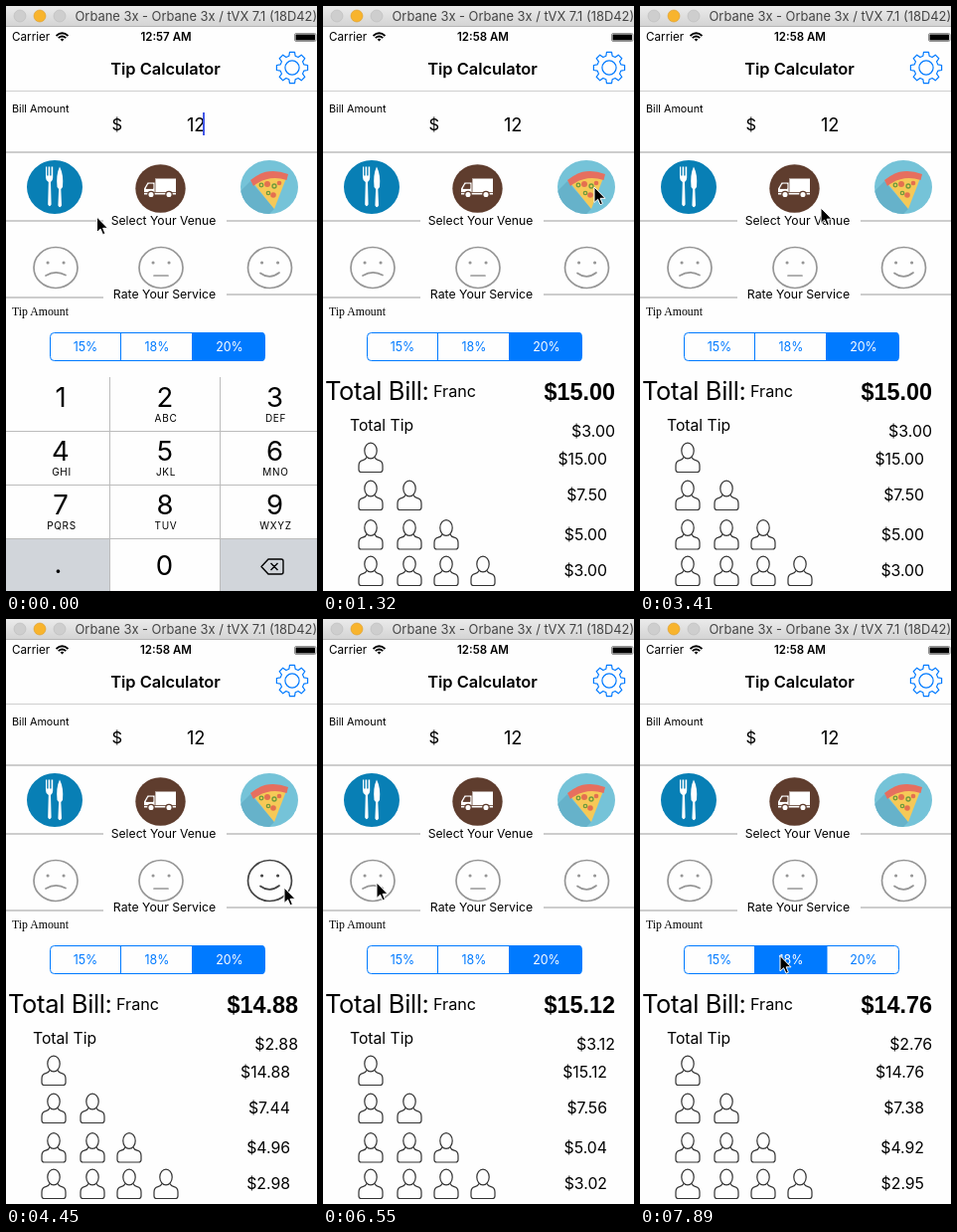
An HTML page that plays this animation: 313x588 px, repeating every 8 s.

```html
<!DOCTYPE html>
<html lang="en">
<head>
<meta charset="utf-8">
<title>Tip Calculator</title>
<style>
  html, body { margin: 0; width: 100%; height: 100%; overflow: hidden; background: #fefefe; }
  svg { display: block; width: 313px; height: 588px; font-family: Inter, Roboto, sans-serif; }
  .rule { stroke: #cdcdcd; stroke-width: 2; }
  .mid { text-anchor: middle; }
  .end { text-anchor: end; }
  .face { fill: none; stroke: #969696; stroke-width: 1.7; stroke-linecap: round; }
  .face.down { stroke: #444; }
  .person { fill: none; stroke: #333; stroke-width: 1.2; }
  .segment rect { fill: none; }
  .segment text { fill: #007aff; font-size: 12.4px; }
  .segment.press rect { fill: #007aff; fill-opacity: .2; }
  .segment.on rect { fill: #007aff; }
  .segment.on text { fill: #fff; }
  .sub { font-size: 10px; letter-spacing: .7px; }
</style>
</head>
<body>
<svg viewBox="0 0 313 588">
  <defs>
    <linearGradient id="chrome" x2="0" y2="1">
      <stop stop-color="#ebebeb"/><stop offset="1" stop-color="#d3d3d3"/>
    </linearGradient>
    <clipPath id="control"><rect x="44" y="328" width="217" height="29" rx="4"/></clipPath>
    <clipPath id="plate"><ellipse cx="265" cy="182" rx="29" ry="27"/></clipPath>
    <g id="person" class="person">
      <ellipse cy="8" rx="6.2" ry="7.8"/>
      <path d="M-4 14.500Q-5 17-8 17.600Q-12 18.500-12 23V27Q-12 29.500-9.500 29.500H9.500Q12 29.500 12 27V23Q12 18.500 8 17.600Q5 17 4 14.500"/>
    </g>
  </defs>
  <rect width="313" height="588" fill="#fefefe"/>

  <!-- window bar -->
  <rect width="313" height="21" fill="url(#chrome)"/>
  <path d="M0 20.5H313" stroke="#b5b5b5"/>
  <g stroke-width=".6">
    <circle cx="14" cy="10" r="6" fill="#cecece" stroke="#bbb"/>
    <circle cx="34" cy="10" r="6" fill="#f8b42d" stroke="#dc9d2a"/>
    <circle cx="54" cy="10" r="6" fill="#cecece" stroke="#bbb"/>
  </g>
  <text x="69.5" y="15" font-size="12.9" fill="#444">Orbane 3x - Orbane 3x / tVX 7.1 (18D42)</text>

  <!-- status and navigation -->
  <text x="6" y="35" font-size="11.7">Carrier</text>
  <g fill="none" stroke="#000" stroke-width="1.7">
    <path d="M50.5 30Q56.5 24.5 62.5 30M52.7 32.2Q56.5 28.8 60.3 32.2"/>
    <path d="M54.6 33.6Q56.5 32 58.4 33.6L56.5 35.6Z" fill="#000" stroke="none"/>
  </g>
  <text id="clock" class="mid" x="161" y="35" font-size="11.5" font-weight="600"></text>
  <rect x="290.5" y="27.5" width="21.5" height="8" rx="1.5" fill="none" stroke="#777" stroke-width=".8"/>
  <rect x="291.500" y="28.500" width="19.500" height="6" rx=".5"/>
  <text class="mid" x="160.5" y="69" font-size="16.4" font-weight="600">Tip Calculator</text>
  <g transform="translate(288 62)" fill="none" stroke="#007aff" stroke-width="1.2" stroke-linejoin="round">
    <path id="gear"/><circle r="7.1"/>
  </g>
  <path d="M0 85.5H313" stroke="#cfcfcf"/>

  <!-- bill -->
  <text x="6" y="107" font-size="10.8">Bill Amount</text>
  <text x="106.5" y="125" font-size="16.5">$</text>
  <text class="end" x="200.5" y="125.5" font-size="18.3">12</text>
  <rect id="caret" x="198" y="107" width="2" height="23" fill="#4257e6"/>
  <path class="rule" d="M0 147H313M0 216H98M222 216H313M0 293H98M222 290H313"/>

  <!-- venues -->
  <ellipse cx="49" cy="182" rx="28" ry="27" fill="#087fb5"/>
  <g fill="#fff">
    <path d="M40 161.500h1.2v9h1.4v-9h1.6v9h1.4v-9h1.6v11q0 3-2.2 4.500l.6 22.500q-1.700 3.500-3.400 0l.6-22.500q-2.800-1.500-2.800-4.500z"/>
    <path d="M54 161.500q4.200 8 3 20.500l-1.700 2 .7 16.500q-1.800 3.500-3.600 0l.7-16.500-1.600-2q-1.300-12.500 2.500-20.500z"/>
  </g>
  <ellipse cx="155.500" cy="183.500" rx="25.200" ry="24.300" fill="#5f3d2e"/>
  <path d="M150 173.500h21v16h-32v-6l3.500-6h7.500z" fill="#fff"/>
  <path d="M143.500 179h4.500v4.500h-7zM150 174v13M139 187.500h32" fill="#5f3d2e" stroke="#5f3d2e" stroke-width=".8"/>
  <g fill="#fff" stroke="#5f3d2e" stroke-width="1.3"><circle cx="146" cy="189.500" r="3.200"/><circle cx="164" cy="189.500" r="3.200"/></g>
  <g clip-path="url(#plate)">
    <rect x="236" y="155" width="58" height="54" fill="#75c3d8"/>
    <path d="M246 176L226 196L250 224L270 204Z" fill="#66b2ca"/>
  </g>
  <path d="M249 178Q264 167 282 173L270 204Z" fill="#f6c957"/>
  <path d="M246 175Q262 161 284 169L282.500 175Q264 169 249 181Z" fill="#e66f5f"/>
  <g fill="#e4704f"><circle cx="263" cy="179" r="3"/><circle cx="269" cy="190" r="2.800"/><circle cx="275" cy="178" r="2.300"/></g>
  <g fill="none" stroke="#6e9a3c" stroke-width="1.300"><circle cx="257" cy="180" r="1.800"/><circle cx="270" cy="181" r="2"/><circle cx="264" cy="188" r="1.700"/></g>
  <text class="mid" x="158.500" y="220" font-size="12.200">Select Your Venue</text>

  <!-- service -->
  <g id="faces"></g>
  <text class="mid" x="159.500" y="294" font-size="12.300">Rate Your Service</text>

  <!-- tip -->
  <text x="6" y="311" font-size="11.800" font-family="Liberation Serif, serif">Tip Amount</text>
  <g id="segments" clip-path="url(#control)"></g>
  <path d="M115.500 328.500V356.500M187.500 328.500V356.500" stroke="#007aff"/>
  <rect x="44.500" y="328.500" width="216" height="28" rx="4" fill="none" stroke="#007aff"/>

  <!-- totals -->
  <text x="2" y="396" font-size="25.500" letter-spacing="-.35">Total Bill:</text>
  <text x="111" y="393" font-size="16.200">Franc</text>
  <text id="total" class="end" x="294" y="396" font-size="23.400" font-weight="700" font-family="Liberation Sans, sans-serif"></text>
  <text x="27" y="427" font-size="15.700">Total Tip</text>
  <text id="tip" class="end" x="294" y="432.500" font-size="15.900"></text>
  <g id="splits"></g>

  <g id="keyboard"></g>
  <path id="pointer" d="M0 0V15.500L3.600 12.200 6 17.700 8.400 16.700 6.100 11.300H11Z" stroke="#fff" stroke-width="1"/>
</svg>
<script>
const $ = id => document.getElementById(id);
const LOOP = 8000, BILL = 12;

// [first change, last change, steps, x, y]
const moves = [
  [140, 1170, 8, 278, 184], [1320, 1320, 1, 273, 182], [1470, 1620, 2, 204, 183],
  [2060, 2510, 4, 38, 269], [2660, 2960, 3, 274, 267], [3110, 3560, 4, 165, 191],
  [3850, 4150, 3, 279, 267], [4300, 4300, 1, 280, 270], [4900, 5350, 4, 154.5, 257.5],
  [5950, 6400, 4, 54, 265], [6850, 7450, 5, 141, 338.5]
];
const rates = [[0, 20], [1170, 25], [3700, 24], [4600, 30], [5650, 28], [6550, 26], [7890, 23]];
const slides = [[0, 0], [290, 70], [440, 165], [580, 220]];
const parties = [1, 2, 3, 5];

const latest = (list, t) => list.filter(([at]) => at <= t).pop()[1];
const money = value => '$' + value.toFixed(2);
const between = (t, from, to) => t >= from && t < to;

function gearPath() {
  const points = [];
  for (let tooth = 0; tooth < 8; tooth++) {
    for (const [offset, r] of [[-.26, 12.2], [-.16, 15.8], [.16, 15.8], [.26, 12.2]]) {
      const a = tooth * Math.PI / 4 + offset;
      points.push((r * Math.cos(a)).toFixed(2) + ' ' + (r * Math.sin(a)).toFixed(2));
    }
  }
  return 'M' + points.join('L') + 'Z';
}

function keyboardMarkup() {
  const centers = [55, 160, 270.5];
  const letters = ['', 'ABC', 'DEF', 'GHI', 'JKL', 'MNO', 'PQRS', 'TUV', 'WXYZ'];
  const digit = (x, y, s) => `<text class="mid" x="${x}" y="${y}" font-size="27.5">${s}</text>`;
  const keys = letters.map((sub, i) => {
    const x = centers[i % 3], y = 403 + 54 * Math.floor(i / 3);
    return digit(x, y, i + 1) + `<text class="mid sub" x="${x + 1}" y="${y + 15}">${sub}</text>`;
  }).join('');
  return `<rect y="373" width="313" height="215" fill="#fefefe"/>
    <path d="M0 535.5H104.500V588H0ZM215.500 535.500H313V588H215.500Z" fill="#d1d5da"/>
    <path d="M0 427.500H313M0 481.500H313M0 535.500H313M104.500 373V588M215.500 373V588" stroke="#bcbcbc" fill="none"/>
    ${keys}${digit(52.500, 570, '.')}${digit(159.500, 572, 0)}
    <path d="M257 563.500L264 556H277Q279 556 279 558V569Q279 571 277 571H264ZM266.500 560L273.500 567M273.500 560L266.500 567"
      fill="none" stroke="#000" stroke-width="1.400" stroke-linejoin="round"/>`;
}

$('gear').setAttribute('d', gearPath());
$('keyboard').innerHTML = keyboardMarkup();
$('faces').innerHTML = [
  [50, 'M-10 8Q0 2 10 7.500'], [156, 'M-7 8H7'], [265.5, 'M-9.500 5.500Q0 12.500 9.500 5'] 
].map(([x, mouth]) => `<g class="face" transform="translate(${x} 263)">
  <ellipse rx="22" ry="20.500"/><path d="${mouth}"/>
  <path d="M-8-5h.1M8-5h.1" stroke-width="3"/></g>`).join('');
$('segments').innerHTML = [[44, 15, 80], [115.5, 18, 152], [187.5, 20, 225]].map(([x, rate, mid]) =>
  `<g class="segment"><rect x="${x}" y="328" width="73" height="29"/>
  <text class="mid" x="${mid}" y="347">${rate}%</text></g>`).join('');
$('splits').innerHTML = [439, 477, 516.5, 553].map((y, row) =>
  [48, 87, 124, 161].slice(0, row + 1).map(x => `<use href="#person" x="${x}" y="${y}"/>`).join('') +
  `<text class="end split" x="286" y="${[461, 497, 537, 573][row]}" font-size="15.800"></text>`).join('');

const faces = [...$('faces').children];
const segments = [...$('segments').children];
const splits = [...document.querySelectorAll('.split')];

function pointerAt(t) {
  let x = 91.5, y = 212;
  for (const [start, end, steps, toX, toY] of moves) {
    if (t < start) break;
    const done = end > start ? Math.floor((t - start) / (end - start) * (steps - 1) + .01) + 1 : 1;
    const p = Math.min(1, done / steps), eased = p * p * (3 - 2 * p);
    x += (toX - x) * eased;
    y += (toY - y) * eased;
  }
  return `translate(${x} ${y})`;
}

function render(t) {
  $('pointer').setAttribute('transform', pointerAt(t));
  $('clock').textContent = t < 290 ? '12:57 AM' : '12:58 AM';
  $('caret').style.opacity = t < 290 ? 1 : 0;
  $('keyboard').setAttribute('transform', `translate(0 ${latest(slides, t)})`);

  const tip = BILL * latest(rates, t) / 100, total = BILL + tip;
  $('tip').textContent = money(tip);
  $('total').textContent = money(total);
  splits.forEach((el, i) => el.textContent = money(total / parties[i]));

  faces[1].classList.toggle('down', between(t, 5500, 5650));
  faces[2].classList.toggle('down', between(t, 4450, 4600));
  segments[1].classList.toggle('press', between(t, 7750, 7890));
  segments[1].classList.toggle('on', t >= 7890);
  segments[2].classList.toggle('on', t < 7890);
}

function tick() {
  render(performance.now() % LOOP);
  requestAnimationFrame(tick);
}
tick();
</script>
</body>
</html>
```
